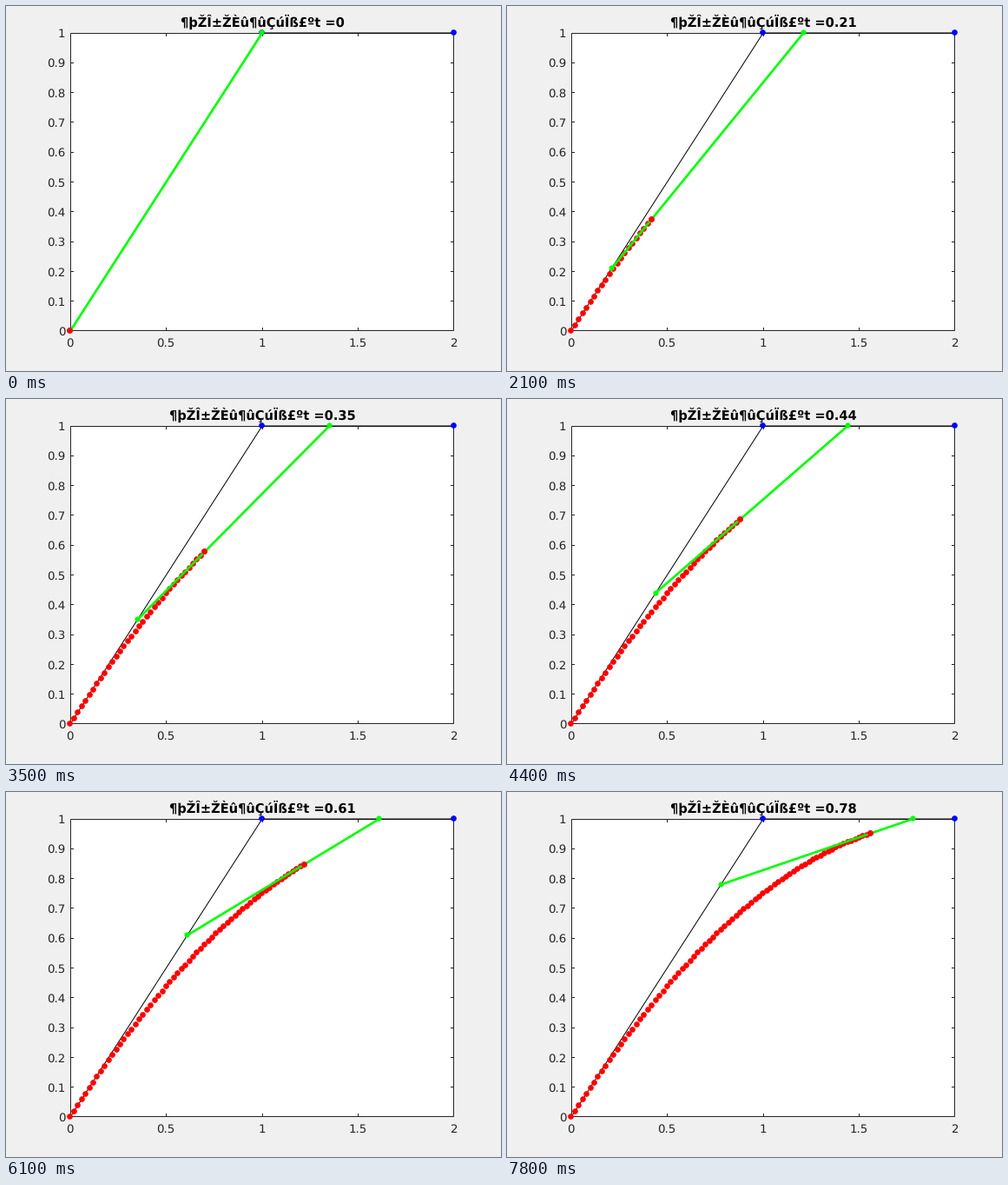
Write a matplotlib script that moves like this. It is 570x420 px and loops after 7900 ms.

```python
import numpy as np
import matplotlib.pyplot as plt
from matplotlib.animation import FuncAnimation
from matplotlib.collections import PolyCollection
from matplotlib.patches import Rectangle

W, H, DPI = 570, 420, 96
LEFT, RIGHT, TOP, BOTTOM = 74, 516, 31, 374
FRAMES, STEP = 79, 0.01
PX = 72 / DPI  # one pixel in points
INK = "#262626"
LABEL = "¶þŽÎ±ŽÈû¶ûÇúÏß£ºt ="

plt.rcParams.update({"font.family": "DejaVu Sans", "text.hinting": "none"})

P = np.array([[0, 0], [1, 1], [2, 1]], float)
angle = np.linspace(0, 2 * np.pi, 40, endpoint=False)
CIRCLE = np.column_stack([np.cos(angle), np.sin(angle)])


def to_px(pts):
    pts = np.atleast_2d(pts)
    x = LEFT + (RIGHT - LEFT) * pts[:, 0] / 2
    y = BOTTOM - (BOTTOM - TOP) * pts[:, 1]
    return np.column_stack([x, y])


def bezier(t):
    t = np.atleast_1d(t)[:, None]
    return (1 - t) ** 2 * P[0] + 2 * t * (1 - t) * P[1] + t ** 2 * P[2]


def discs(pts, r):
    """Circle outlines centred on whole pixels."""
    centres = np.ceil(to_px(pts) - 1e-6) - 0.5
    return centres[:, None] + r * CIRCLE


fig = plt.figure(figsize=(W / DPI, H / DPI), dpi=DPI, facecolor="#f0f0f0")
ax = fig.add_axes([0, 0, 1, 1])
ax.set_xlim(0, W)
ax.set_ylim(H, 0)
ax.axis("off")


def line(x, y, color, width, z):
    return ax.plot(x, y, color=color, lw=width, zorder=z, snap=False,
                   solid_capstyle="butt", solid_joinstyle="miter")[0]


def dots(color, z, verts=()):
    return ax.add_collection(
        PolyCollection(verts, facecolor=color, edgecolor="none", zorder=z),
        autolim=False)


# Box with inward ticks on all four sides
x0, x1, y0, y1 = LEFT + 0.5, RIGHT - 0.5, TOP + 0.5, BOTTOM - 0.5
ax.add_patch(Rectangle((x0, y0), x1 - x0, y1 - y0, fc="white", ec=INK,
                       lw=PX, snap=False, zorder=1))
TICK = 3.5
for v in np.arange(5) / 2:
    x = to_px([v, 0])[0, 0]
    ax.text(x - 0.5, 392, f"{v:g}", size=10, color=INK,
            ha="center", va="baseline")
    if 0 < v < 2:
        x = np.floor(x) + 0.5
        line([x, x], [y1, y1 - TICK], INK, PX, 1)
        line([x, x], [y0, y0 + TICK], INK, PX, 1)
for v in np.arange(11) / 10:
    y = to_px([0, v])[0, 1]
    ax.text(68.5, y + 5, f"{v:g}", size=10, color=INK,
            ha="right", va="baseline")
    if 0 < v < 1:
        y = np.floor(y) + 0.5
        line([x0, x0 + TICK], [y, y], INK, PX, 1)
        line([x1, x1 - TICK], [y, y], INK, PX, 1)

title = ax.text(295, 24, "", size=11, weight="bold", color="black",
                ha="center", va="baseline")

BIG, SMALL = 10 / 3, 3.1
line(*to_px(P).T, "black", PX, 2)
dots("blue", 3, discs(P[1:], BIG))
trail = dots("red", 4)
rod = line([], [], "lime", 2, 5)
ends = dots("lime", 6)
head = dots("red", 7)


def update(k):
    t = k * STEP
    pair = P[:2] + t * (P[1:] - P[:2])
    curve = bezier(np.arange(k + 1) * STEP)
    trail.set_verts(discs(curve, BIG))
    rod.set_data(*to_px(pair).T)
    ends.set_verts(discs(pair, SMALL))
    head.set_verts(discs(curve[-1], BIG))
    title.set_text(f"{LABEL}{k / 100:g}")
    return trail, rod, ends, head, title


anim = FuncAnimation(fig, update, frames=FRAMES, interval=100,
                     init_func=lambda: update(0), repeat=True, repeat_delay=0)
plt.show()
```
